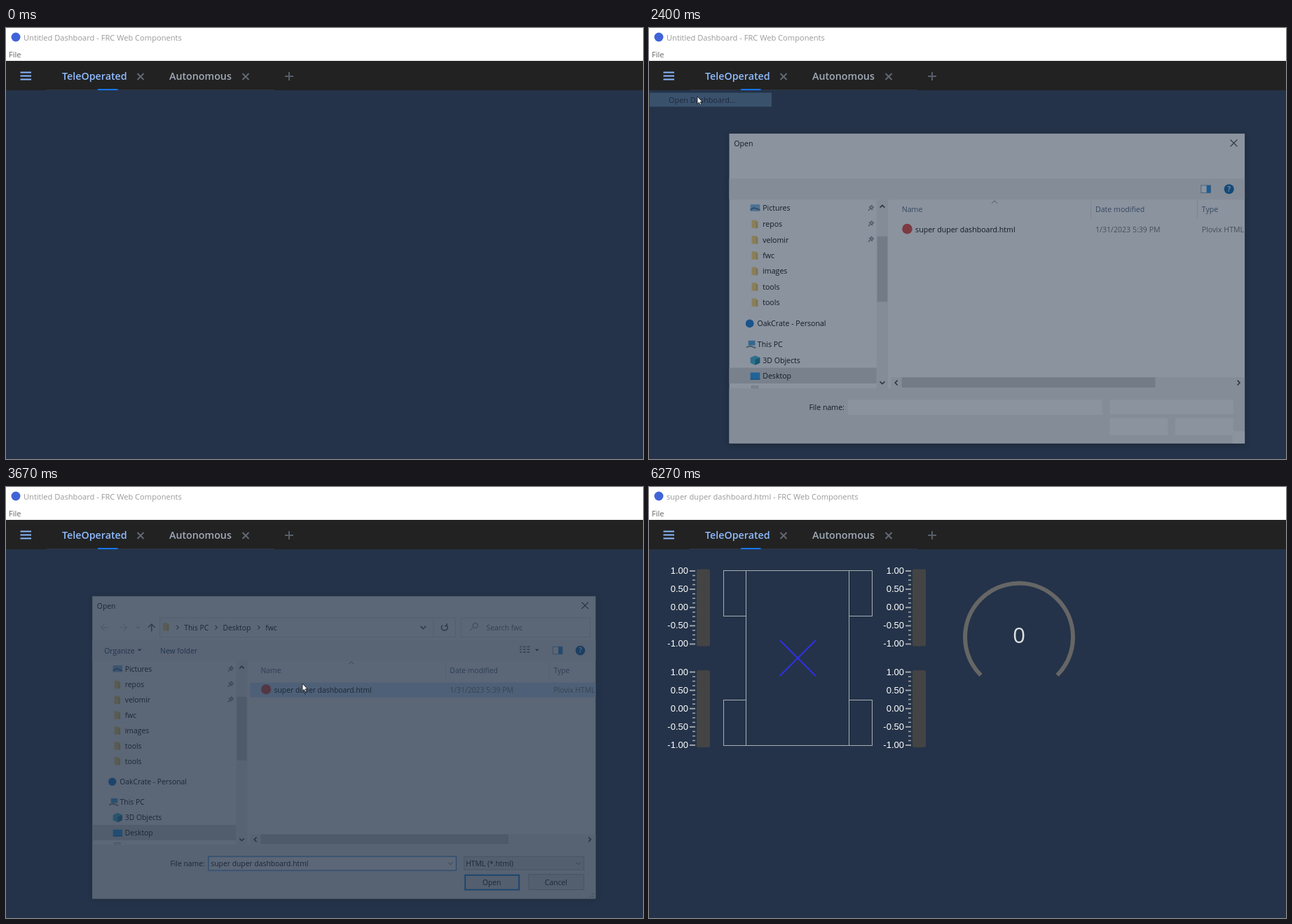
Recreate the animation shown at these times as an HTML page. Size 909 by 616 pixels, loop 6470 ms.

```html
<!DOCTYPE html>
<html lang="en">
<head>
<meta charset="utf-8">
<title>Opening a dashboard</title>
<style>
  html, body { margin: 0; width: 100%; height: 100%; overflow: hidden; background: #243349; }
  svg { display: block; width: 909px; height: 616px; font: 11.1px "Open Sans", "Noto Sans", sans-serif; }
  #menu, #picked, #dialog { font-size: 10.9px; }
  .tab { font-size: 14.25px; font-weight: 600; }
  .scale { font: 13px "Liberation Sans", Arial, sans-serif; }
  .shadow { filter: drop-shadow(0 2px 5px #0007); }
</style>
</head>
<body>
<svg id="stage" viewBox="0 0 909 616"></svg>
<script>
const LOOP = 6470, STEP = 200 / 3;
const stage = document.getElementById('stage');

const rect = (x, y, w, h, fill, more = '') =>
  `<rect x="${x}" y="${y}" width="${w}" height="${h}" fill="${fill}" ${more}/>`;
const line = (d, color, width = 1, more = '') =>
  `<path d="${d}" fill="none" stroke="${color}" stroke-width="${width}" ${more}/>`;
const dot = (x, y, r, fill) => `<circle cx="${x}" cy="${y}" r="${r}" fill="${fill}"/>`;
const text = (x, y, s, fill = '#000', more = '') =>
  `<text x="${x}" y="${y}" fill="${fill}" ${more}>${s}</text>`;
const group = (id, body) => `<g id="${id}">${body}</g>`;
const cross = (x, y, r, color, width) =>
  line(`M${x - r} ${y - r}l${2 * r} ${2 * r}M${x + r} ${y - r}l${-2 * r} ${2 * r}`, color, width);
const chevron = (x, y, turn, color = '#444', size = 4, width = 1.2) =>
  line(`M${-size} ${-size / 2}L0 ${size / 2}L${size} ${-size / 2}`, color, width,
    `transform="translate(${x} ${y}) rotate(${turn})"`);

function app() {
  return rect(0, 0, 909, 47, '#fff') + dot(14, 13, 6.5, '#4064d8') +
    rect(.5, 28.5, 24, 18, '#cce8ff', 'id="fileBox" stroke="#99d1ff"') +
    text(25, 18, '', '#999', 'id="title"') + text(4, 42, 'File', '#666', 'id="file"') +
    rect(0, 47, 909, 42, '#222') + rect(0, 89, 909, 527, '#243349') +
    line('M20.5 63.5h15.5M20.5 68.5h15.5M20.5 73.5h15.5', '#8ab8ff', 2) +
    rect(58, 88, 325, 1, '#2c3642') + rect(131, 87, 28.5, 2, '#1676f3') +
    text(80, 74, 'TeleOperated', '#90bcff', 'class="tab"') + cross(192, 69.5, 4.5, '#626973', 2) +
    text(233, 74, 'Autonomous', '#a1abb7', 'class="tab"') + cross(342, 69.5, 4.5, '#626973', 2) +
    line('M398 69h12M404 63v12', '#565e69', 2);
}

function meter(x, y) {
  let out = rect(x + 68, y + 117.5, 19, 110, '#444', 'rx="2"');
  for (let i = 0; i <= 16; i++) {
    const ty = y + 120 + i * 6.53, major = i % 4 === 0;
    out += line(`M${x + (major ? 58 : 62)} ${ty}H${x + 66}`, '#a0a3a8', major ? 2 : 1.6);
    if (major) out += text(x + 56, ty + 4, (1 - i / 8).toFixed(2), '#fff', 'class="scale" text-anchor="end"');
  }
  return out;
}

function robot() {
  const wheels = [[106.5, 119.5], [285.5, 119.5], [106.5, 304.5], [285.5, 304.5]];
  const edge = 'stroke="#a9adb3"';
  return [[0, 0], [308, 0], [0, 144.5], [308, 144.5]].map(p => meter(...p)).join('') +
    rect(138.5, 119.5, 147, 250, 'none', edge) +
    wheels.map(([x, y]) => rect(x, y, x < 200 ? 32 : 33, 65, 'none', edge)).join('') +
    cross(212.3, 244.5, 25.3, '#3030e0', 2) +
    line('M473.5 269A77 77 0 1 1 582.5 269', '#666', 6) +
    text(528, 223, '0', '#dfe1e4', 'text-anchor="middle" font-size="31"');
}

const items = [['New Dashboard', 59], ['New Window', 79], ['Open Dashboard...', 103], ['Save Dashboard', 123],
  ['Save Dashboard As...', 143], ['Manage Plugins', 163], ['Close Window', 187], ['Quit', 207]];

function menu() {
  return rect(.5, 47, 176.5, 171, '#f2f2f2', 'stroke="#d0d0d0" stroke-width=".6" class="shadow"') +
    line('M25 90.5H175M25 174.5H175', '#d5d5d5') +
    rect(1, 0, 174, 20, '#91c9f7', 'id="hover"') +
    items.map(([s, y]) => text(28, y + 4, s)).join('');
}

const folder = (x, y) => rect(x, y - 6, 7, 12, '#f8d775') + rect(x + 6, y - 4, 3, 10, '#e9bd55');
const pin = y => line(`M309 ${y + 4}l3.5 -3.5M310 ${y - 2}l5 5M313 ${y - 4}l4 4M311.5 ${y - 1}l3 -2M314 ${y + 2}l2 -3`, '#8a8f96', 1.6);
const screen = (x, y) => rect(x, y - 5, 14, 10, '#1d9cf0') + rect(x, y + 4, 14, 1.5, '#1270b8');

function tree() {
  const folders = ['repos', 'velomir', 'fwc', 'images', 'tools', 'tools'];
  return rect(105, 489, 216, 23, '#d9d9d9') +
    rect(136, 249, 14, 10, '#7db9e8') + line('M136 257l5 -3l9 3', '#3d6a94', 2) + text(154, 258.5, 'Pictures') +
    folders.map((s, i) => folder(138, 278 + i * 23) + text(154, 282 + i * 23, s)).join('') +
    [254, 277, 300].map(pin).join('') +
    dot(135, 424, 6, '#0f78d4') + text(146, 428, 'OakCrate - Personal') +
    rect(133, 449, 10, 7, '#4aa5e0') + line('M130 459l6 -2l8 3', '#788', 2) + text(146.5, 458.5, 'This PC') +
    '<path d="M136 474l7 -3l7 3v8l-7 3l-7 -3z" fill="#35b5d5"/><path d="M143 477l7 -3v8l-7 3z" fill="#147f9f"/>' +
    text(154, 482, '3D Objects') + screen(136, 501) + text(154, 505, 'Desktop') +
    rect(138, 516, 9, 2.5, '#fff', 'stroke="#aaa"') +
    rect(321, 242, 17, 277, '#f0f0f0') + rect(322, 296, 15, 96, '#cdcdcd') +
    chevron(329.5, 252, 180, '#333', 3.5, 1.6) + chevron(329.5, 511, 0, '#333', 3.5, 1.6);
}

function files() {
  const head = '#4c607a', grey = '#6d6d6d';
  return rect(342, 275, 519, 22, '#e5f3ff', 'id="row"') +
    group('header', rect(342, 243, 293, 26, '#d9ebf9') + line('M619.5 243v26', '#b5d5ea') + chevron(627, 256, 0, '#555', 3, 1)) +
    line('M635.5 243v26M791.5 243v26', '#e2e2e2') + chevron(494, 245.5, 180, '#777', 4, 1) +
    text(358, 260.5, 'Name', head) + text(642, 260.5, 'Date modified', head) + text(798, 260.5, 'Type', head) +
    dot(366, 285, 7.5, '#e0443a') + text(378, 290, 'super duper dashboard.html') +
    text(642, 290, '1/31/2023 5:39 PM', grey) + text(798, 290, 'Plovix HTML Do', grey, 'clip-path="url(#inside)"') +
    rect(342, 503, 519, 16, '#f0f0f0') + rect(358, 503, 372, 15, '#cdcdcd') +
    chevron(350, 511, 90, '#333', 3.5, 1.6) + chevron(852, 511, -90, '#333', 3.5, 1.6);
}

// Parts of the dialog that paint only once it is fully open.
function controls() {
  const ink = '#1e395b', mid = 'text-anchor="middle"';
  const tri = x => `<path d="M${x - 3} 224.5h6l-3 3z" fill="${ink}"/>`;
  let list = '';
  for (let y = 221; y < 233; y += 4) list += line(`M747 ${y}h3M752 ${y}h4M758 ${y}h4`, '#7b8188', 2);
  return line('M129 192h-11m5 -5l-5 5l5 5M146 192h11m-5 -5l5 5l-5 5', '#cfcfcf', 1.3) +
    chevron(174, 192, 0, '#bbb', 2.5) + line('M194 198v-11m-5 5l5 -5l5 5', '#555', 1.5) +
    rect(206.5, 177.5, 444, 29, '#fff', 'id="address" stroke="#d9d9d9"') + line('M617.5 178v28', '#d9d9d9') +
    folder(211, 191) + [233, 291, 355].map(x => chevron(x, 192, -90, '#444', 3)).join('') +
    text(243, 196, 'This PC') + text(301, 196, 'Desktop') + text(365, 196, 'fwc') +
    chevron(602, 192, 0, '#444', 4, 1.6) + line('M631 188.5A4.6 4.6 0 1 0 637 188.5M637.5 186v3.5h-3.5', '#444', 1.5) +
    rect(658.5, 177.5, 194, 29, '#fff', 'stroke="#d9d9d9"') +
    line('M672.5 196.5l4.5 -4.5M676.5 189a3.8 3.8 0 1 0 7.6 0a3.8 3.8 0 1 0 -7.6 0', '#777') +
    text(697, 196, 'Search fwc', '#666') +
    text(123, 231, 'Organize', ink) + tri(176) + text(207, 231, 'New folder', ink) + list + tri(773) +
    rect(279.5, 536.5, 372, 21, '#fff', 'stroke="#0078d7"') + chevron(643, 547, 0, '#555', 3.5, 1) +
    text(283, 551, 'super duper dashboard.html', '#000', 'id="name"') +
    rect(663.5, 536.5, 180, 20, '#e1e1e1', 'stroke="#adadad"') + text(666, 551, 'HTML (*.html)') + chevron(835, 547, 0, '#555', 3.5, 1) +
    rect(665, 564.5, 81, 22, '#e1e1e1', 'stroke="#0078d7" stroke-width="2"') + text(705, 580, 'Open', '#000', mid) +
    rect(760.5, 563.5, 83, 23, '#e1e1e1', 'stroke="#adadad"') + text(801.5, 580, 'Cancel', '#000', mid) +
    line('M852 597h2M856 597h2M856 593h2', '#b0b0b0', 2);
}

function dialog() {
  return '<clipPath id="inside"><path d="M105 145H861V600H105z"/></clipPath>' +
    rect(105, 145, 756, 455, '#fff', 'class="shadow"') + text(112, 163.5, 'Open') + cross(845, 159, 5, '#222', 1.1) +
    rect(105, 211, 756, 30, '#f5f6f7', 'id="bar"') + line('M105 241.5H861', '#eceef0') +
    rect(797, 221, 14, 11, '#fff', 'stroke="#7d9cb8"') + rect(805, 221, 6, 11, '#1d8be0') +
    dot(838, 226.5, 7.2, '#0063b1') + text(838, 230.5, '?', '#fff', 'text-anchor="middle" font-weight="600"') +
    tree() + files() + rect(105, 519, 756, 81, '#f0f0f0') +
    text(274, 551, 'File name:', '#000', 'text-anchor="end"') +
    group('blank', rect(279, 536, 373, 22, '#fff') + rect(663, 536, 181, 21, '#fff') +
      rect(663, 563, 85, 25, '#fff') + rect(759, 563, 85, 25, '#fff') + rect(843, 582, 18, 18, '#fff')) +
    group('controls', controls());
}

stage.innerHTML = app() + group('robot', robot()) + group('menu', menu()) +
  group('picked', rect(1, 92.5, 174, 20, '#91c9f7') + text(28, 107, items[2][0])) +
  group('dialog', dialog()) +
  group('cursor', '<path d="M0 0V10.5L2.4 8.3L4.1 12L5.8 11.2L4.2 7.7H7.3z" fill="#fff" stroke="#111" stroke-width=".8"/>');

const el = {};
stage.querySelectorAll('[id]').forEach(e => el[e.id] = e);
const show = (e, alpha) => {
  e.style.display = alpha ? '' : 'none';
  e.setAttribute('opacity', +alpha);
};

// Pointer trail as [tick, x, y]; it is drawn at 15 ticks per second.
const trail = [[1, 875, 595], [3, 585, 440], [5, 340, 315], [7, 257, 278], [10, 257, 278], [11, 235, 250],
  [13, 92, 85], [14, 52, 45], [16, 28, 42], [19, 10, 38], [23, 10, 38], [30, 69, 98], [39, 69, 98],
  [41, 140, 135], [42, 225, 178], [44, 360, 238], [46, 418, 267], [48, 423, 281], [75, 423, 281],
  [77, 330, 140], [79, 140, 300], [81, 35, 598]];

function pointer(n) {
  const i = trail.findIndex(k => k[0] >= n);
  if (n < 1 || i < 0) return null;
  const b = trail[i], a = trail[i - 1] || b, f = (n - a[0]) / (b[0] - a[0] || 1);
  return [a[1] + (b[1] - a[1]) * f, a[2] + (b[2] - a[2]) * f];
}

function tick(t) {
  let n = Math.ceil(t / STEP) + 1;
  while (Math.round(n * STEP / 10) * 10 > t) n--;
  return n;
}

function draw(t) {
  const n = tick(t), within = (a, b) => n >= a && n < b;
  const loaded = n >= 57, active = within(19, 35) || within(56, 94);
  const at = pointer(n);

  el.title.textContent = (loaded ? 'super duper dashboard.html' : 'Untitled Dashboard') + ' - FRC Web Components';
  el.title.setAttribute('fill', active ? '#000' : '#999');
  el.file.setAttribute('fill', active ? '#000' : '#666');
  show(el.fileBox, within(17, 33));
  show(el.robot, loaded);

  show(el.menu, within(20, 33) && (n === 20 ? .5 : 1));
  const over = at && items.find(i => Math.abs(i[1] - at[1]) <= 10);
  show(el.hover, !!over);
  if (over) el.hover.setAttribute('y', over[1] - 10.5);
  show(el.picked, within(33, 37) && .2 * (37 - n));

  const [alpha, size] = { 36: [.47, .973], 37: [.85, .993], 54: [.6, .98], 55: [.25, .95] }[n] || [within(38, 54) ? 1 : 0, 1];
  show(el.dialog, alpha);
  el.dialog.setAttribute('transform', `translate(${483 * (1 - size) - (size < 1) * .7} ${372 * (1 - size) - (size < 1) * .2}) scale(${size})`);
  show(el.controls, n > 37);
  show(el.blank, n <= 37);
  el.bar.setAttribute('fill', n > 37 ? '#f5f6f7' : '#f0f0f0');
  el.address.setAttribute('stroke', n === 42 ? '#8a8a8a' : '#d9d9d9');
  show(el.header, within(45, 48));
  show(el.row, n >= 48);
  el.row.setAttribute('fill', n >= 50 ? '#cce8ff' : '#e5f3ff');
  show(el.name, n >= 51);

  show(el.cursor, !!at);
  if (at) el.cursor.setAttribute('transform', `translate(${at[0]} ${at[1]})`);
}

const start = performance.now();
function loop() {
  draw((performance.now() - start) % LOOP);
  requestAnimationFrame(loop);
}
loop();
</script>
</body>
</html>
```
